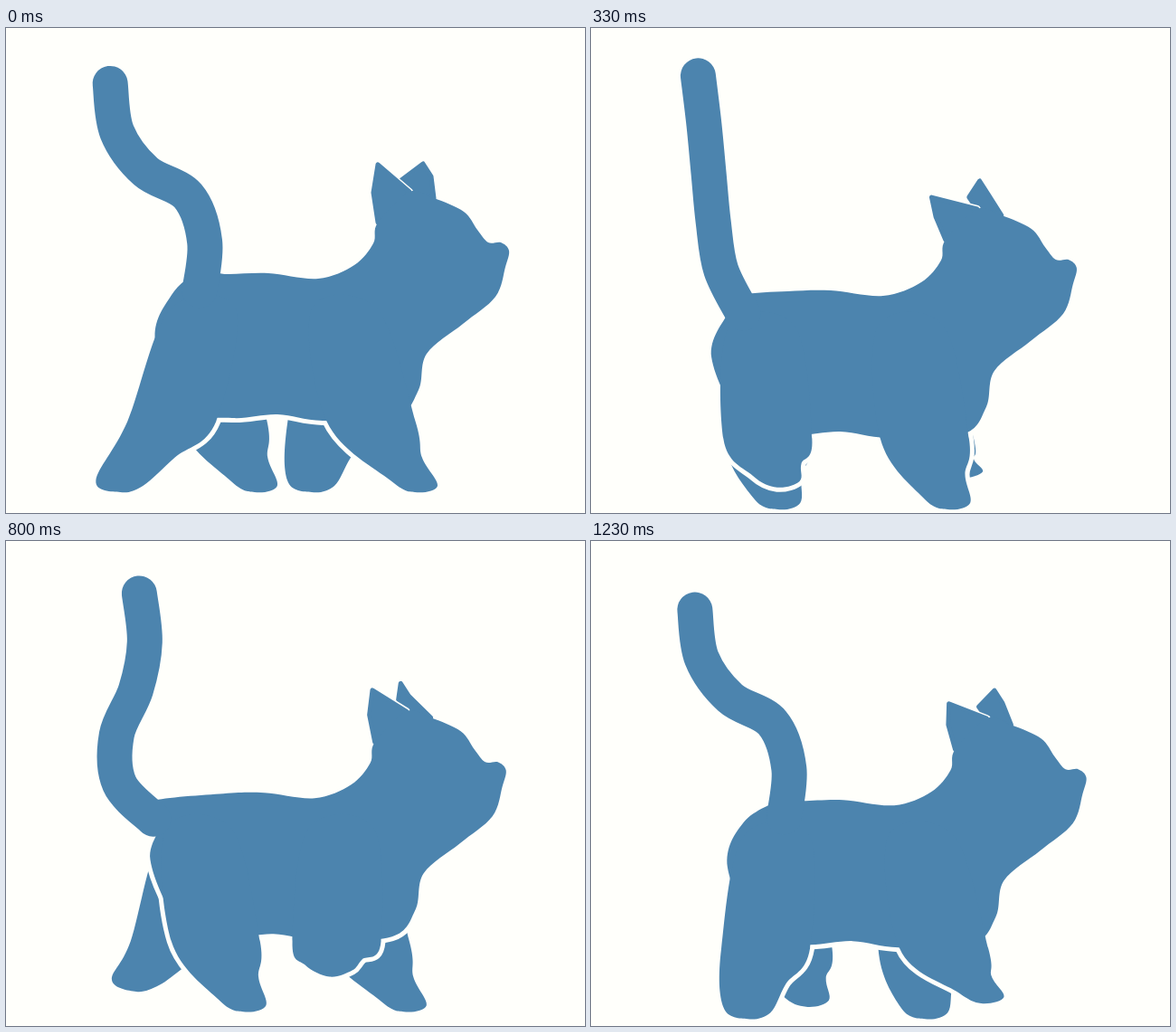
An HTML page with a canvas that plays this animation: 640 px wide and 536 px high, repeating every 1260 ms.

```html
<!DOCTYPE html>
<html lang="en">
<head>
<meta charset="utf-8">
<title>Walking cat</title>
<style>
  html, body { margin: 0; width: 100%; height: 100%; overflow: hidden; background: #fffffb; }
  canvas { display: block; }
</style>
</head>
<body>
<canvas id="stage" width="640" height="536"></canvas>
<script>
const ctx = document.getElementById('stage').getContext('2d');
const { sin, cos, max, min, PI } = Math;
const PAPER = '#fffffb', FUR = '#4c84ae';
const LOOP = 1260, STEP = 100 / 3, STRIDE = 1320;
const GROUND = 513, GAP = 10;

// Resting silhouette, clockwise from the tail.
const BACK = [[245, 272], [290, 271], [345, 277], [385, 262], [406, 238], [411, 215]];
const HEAD = [[473, 188], [506, 203], [521, 223], [533, 237], [547, 237], [556, 246], [552, 264], [541, 297]];
const CHEST = [[505, 327], [465, 360], [456, 400], [430, 430]];
const BELLY = [[350, 434], [300, 427], [250, 431]];
const RUMP = [[200, 420], [165, 345], [183, 295]];

// Tail headings from root to tip, in degrees off vertical.
const TAIL_LEAN = [-24, -10, -10, -8, -7];
const TAIL_SWING = [30, -10, -50, -28, -1];
const TAIL_PART = 54;

const HIND = { hip: 218, center: 200, reach: 74, lift: 45, lead: PI - 0.1 };
const FRONT = { hip: 374, center: 395, reach: 57, lift: 70, lead: 0 };

// Catmull-Rom curve through the points.
function curve(points, closed = true) {
  const path = new Path2D(), count = points.length;
  const at = i => points[closed ? (i + count) % count : min(max(i, 0), count - 1)];
  path.moveTo(...points[0]);
  for (let i = 0; i < count - (closed ? 0 : 1); i++) {
    const [p, a, b, q] = [at(i - 1), at(i), at(i + 1), at(i + 2)];
    path.bezierCurveTo(
      a[0] + (b[0] - p[0]) / 6, a[1] + (b[1] - p[1]) / 6,
      b[0] - (q[0] - a[0]) / 6, b[1] - (q[1] - a[1]) / 6, ...b);
  }
  if (closed) path.closePath();
  return path;
}

function polygon(points) {
  const path = new Path2D();
  points.forEach(p => path.lineTo(...p));
  path.closePath();
  return path;
}

function outline(path, color, width) {
  ctx.strokeStyle = color;
  ctx.lineWidth = width;
  ctx.stroke(path);
}

function fill(path) {
  ctx.fillStyle = FUR;
  ctx.fill(path);
}

// The paw slides back along the ground, then swings forward folded up.
function leg({ hip, center, reach, lift, lead }, walk, sway) {
  const phase = walk + lead, swing = max(0, -sin(phase));
  const x = center + reach * cos(phase) + 12 * swing;
  const y = GROUND - lift * swing * (1 - cos(phase)) / 2;
  const top = sway(hip), thigh = top + (x - top) * 0.38;
  const knee = [thigh + 49, 435], toe = [x + 25, y - 7];
  const ankle = [(knee[0] + toe[0]) / 2 - 5, (knee[1] + toe[1]) / 2 + 4];
  return curve([
    [top - 36, 310], [thigh - 49, 435], [x - 27, y - 13], [x, y],
    toe, ankle, knee, [top + 36, 310]
  ]);
}

function tailPoints(beat) {
  let x = 180 + 24 * cos(beat) + 10 * cos(2 * beat), y = 296 - 6 * cos(beat);
  const points = [[x, y]];
  TAIL_LEAN.forEach((lean, i) => {
    const heading = (lean + TAIL_SWING[i] * cos(beat)) * PI / 180;
    points.push([x += TAIL_PART * sin(heading), y -= TAIL_PART * cos(heading)]);
  });
  return points;
}

function draw(time) {
  // The walk slows down towards the end of the loop.
  const stride = time / STRIDE;
  const walk = 2 * PI * (stride - 2 * max(0, stride - 0.7) ** 2);

  const bob = 9.5 * (1 - cos(2 * walk));
  const shift = -0.8 * bob - 4 * sin(walk);
  const sway = x => x + shift * (1 + 0.7 * min(1, max(0, (400 - x) / 250)));
  const place = points => points.map(([x, y]) => [sway(x), y]);

  const tail = tailPoints(2 * PI * time / LOOP);
  const [rootX, rootY] = tail[0];
  const back = place(BACK), head = place(HEAD);
  const [notch, farSide] = place([[446, 181], [437, 168]]);

  const body = curve([
    ...back, notch, ...head, ...place(CHEST), ...place(BELLY), ...place(RUMP),
    [rootX, rootY - 20]
  ]);
  const near = [body, leg(HIND, walk, sway), leg(FRONT, walk, sway)];
  const far = [leg(HIND, walk + PI, sway), leg(FRONT, walk + PI, sway)];

  // Ears fold back as the head drops.
  const nearTip = [sway(411) + 0.8 * shift, 151 + 0.9 * bob];
  const nearSide = [sway(406) + 0.3 * shift, 182 + 0.4 * bob];
  const farTip = [sway(449) + 12 * cos(walk), 150];
  const nearEar = polygon([nearTip, nearSide, back[back.length - 1], notch]);
  const farEar = polygon([farTip, farSide, notch, head[0], [farTip[0] + 9, 164]]);

  ctx.fillStyle = PAPER;
  ctx.fillRect(0, 0, 640, 536);
  ctx.lineCap = ctx.lineJoin = 'round';

  ctx.save();
  ctx.translate(0, bob);
  far.forEach(fill);
  near.forEach(path => outline(path, PAPER, GAP));

  fill(farEar);
  outline(farEar, FUR, 5);
  outline(nearEar, PAPER, 8);
  fill(nearEar);
  outline(nearEar, FUR, 5);

  near.forEach(fill);
  outline(curve(tail, false), FUR, 39);
  ctx.restore();
}

const start = performance.now();
function tick() {
  const time = (performance.now() - start) % LOOP;
  draw(min(Math.floor((time + 5) / STEP), 37) * STEP);
  requestAnimationFrame(tick);
}
tick();
</script>
</body>
</html>
```
